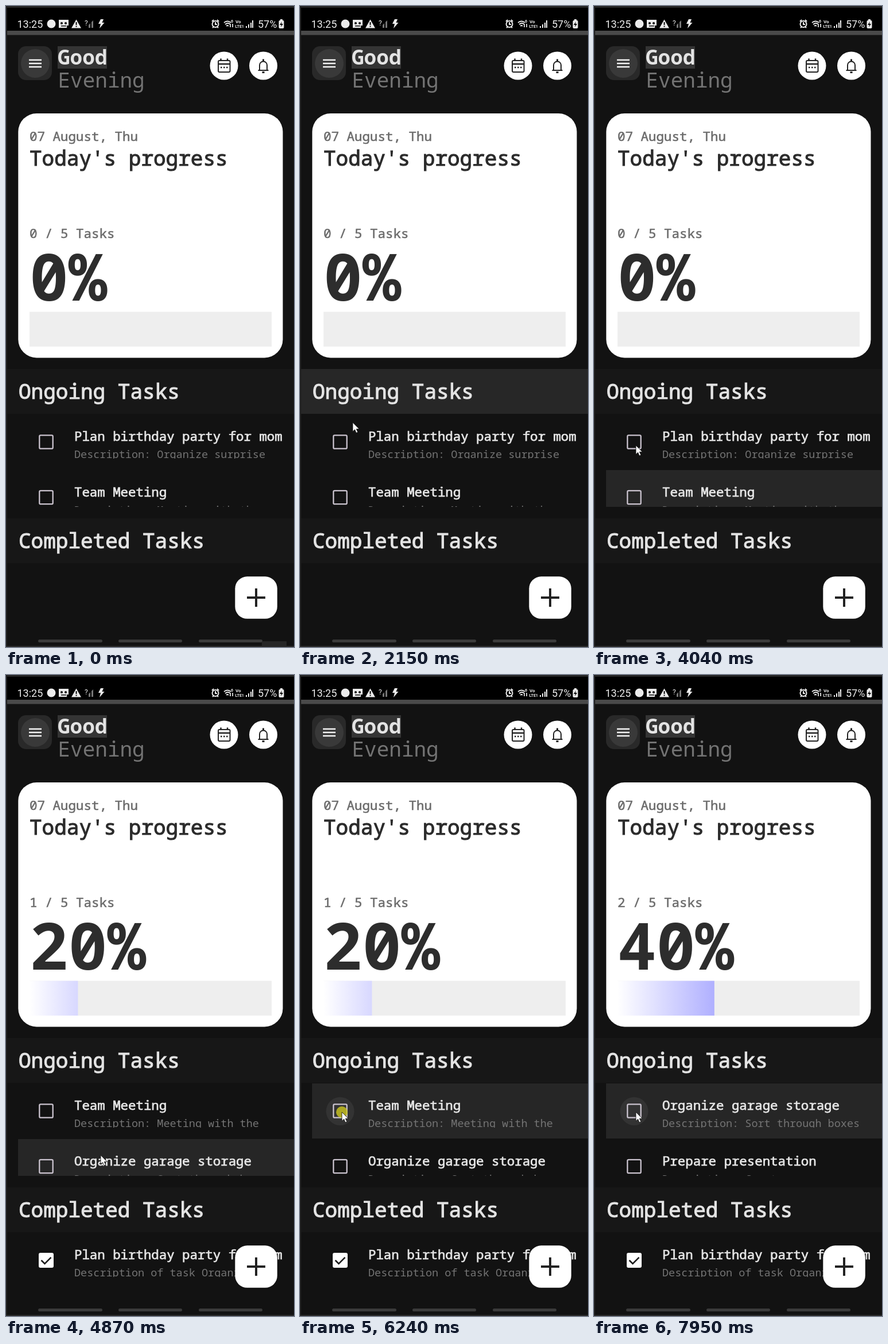
Animation, 502 px wide and 1116 px high, one loop 7.99 s. Source, as an HTML page:

```html
<!DOCTYPE html>
<html lang="en">
<head>
<meta charset="utf-8">
<title>Task list</title>
<style>
  html, body { margin: 0; width: 100%; height: 100%; overflow: hidden; background: #121212; }
  svg { display: block; width: 502px; height: 1116px; }
  text { font-family: "Noto Sans Mono", "DejaVu Sans Mono", monospace; white-space: pre; }
  .ui { font-family: Roboto, "Open Sans", sans-serif; }
  /* a thin outline gives the medium weight */
  .head { font-size: 36px; fill: #e4e4e4; stroke: #e4e4e4; stroke-width: 1.1; }
  .dark { fill: #2b2b2b; stroke: #2b2b2b; }
  .title { font-size: 22.4px; fill: #e6e6e6; stroke: #e6e6e6; stroke-width: .75; }
  .desc { font-size: 18.5px; fill: #747474; }
  .meta { font-size: 22.5px; fill: #6c6c6c; stroke: #6c6c6c; stroke-width: .6; }
  .line { fill: none; stroke: #222; stroke-width: 2; }
  .box { fill: none; stroke: #cbc4cf; stroke-width: 2.3; }
</style>
</head>
<body>
<svg viewBox="0 0 502 1116" xmlns="http://www.w3.org/2000/svg">
  <defs>
    <linearGradient id="fade" gradientUnits="userSpaceOnUse" x1="41" x2="463">
      <stop stop-color="#fff"/><stop offset="1" stop-color="#3939ff"/>
    </linearGradient>
    <clipPath id="clip1"><rect x="21" y="711" width="481" height="77"/></clipPath>
    <clipPath id="clip2"><rect x="21" y="808" width="481" height="64"/></clipPath>
    <clipPath id="clip3"><rect x="21" y="970" width="481" height="78"/></clipPath>
  </defs>

  <rect width="502" height="1116" fill="#121212"/>
  <rect width="502" height="3" fill="#262626"/>
  <rect y="3" width="502" height="40" fill="#000"/>
  <rect y="43" width="502" height="7.5" fill="#4a4a4a"/>

  <!-- status bar -->
  <g fill="#ececec">
    <text class="ui" x="19.5" y="37.5" font-size="18">13:25</text>
    <circle cx="79" cy="31" r="7.5"/>
    <path d="M92 24h17v10h-3v4h-14z"/>
    <path d="M122.5 23.5L131 38.5H114z"/>
    <path d="M165 23h5l-2.5 6h4l-8.5 10 2-8h-4z"/>
    <path d="M152 25v13h-3v-10zM147 30v8h-3v-5z" fill="#777"/>
    <text class="ui" x="137" y="34" font-size="12">?</text>
    <text class="ui" x="439" y="37.5" font-size="18">57%</text>
    <rect x="475.5" y="25" width="9" height="14" rx="2"/><rect x="478" y="23" width="4" height="3"/>
    <path d="M418 38v-3h2v3zm4 0v-6h2v6zm4 0v-9h2v9z"/><path d="M429 38V25h2v13z"/>
    <text class="ui" x="400" y="30" font-size="8" font-weight="700">Vo</text>
    <text class="ui" x="399.5" y="38" font-size="7" font-weight="700">LTE1</text>
    <text class="ui" x="392" y="29" font-size="7" font-weight="700">6</text>
  </g>
  <g fill="none" stroke="#ececec" stroke-width="2">
    <circle cx="365" cy="31.5" r="5.5"/><path d="M365 28v4h3M359 27l3-3M371 27l-3-3M360 38l2-2M370 38l-2-2"/>
    <path d="M380 29q6-5 12 0M382 32q5-4 9 0M384 35q2-2 4 0M391 37v-6M395 31v6" stroke-width="1.7"/>
  </g>
  <g fill="#000">
    <circle cx="97" cy="30" r="2"/><circle cx="104" cy="30" r="2"/><rect x="96" y="34" width="9" height="1.5"/>
    <rect x="121.6" y="28" width="1.9" height="5"/><rect x="121.6" y="34.5" width="1.9" height="2"/>
    <path d="M481 27l-4 6h3l-1 4 4-6h-3z"/>
  </g>

  <!-- app header -->
  <rect x="21" y="70" width="59" height="59" rx="14" fill="#292929"/>
  <circle cx="51" cy="100" r="25" fill="#393939"/>
  <path d="M40 94h22M40 100h22M40 106h22" stroke="#f4f4f4" stroke-width="2.3"/>
  <rect x="90" y="70" width="86" height="39" fill="#343434"/>
  <text class="head" x="90" y="102" style="font-weight:700;stroke:none">Good</text>
  <text class="head" x="90.5" y="142" style="fill:#737373;stroke:none">Evening</text>
  <circle cx="380" cy="104" r="24.5" fill="#fff"/>
  <circle cx="448.5" cy="104" r="24.5" fill="#fff"/>
  <g class="line">
    <rect x="370" y="95" width="20.5" height="20" rx="2"/>
    <path d="M370 101h20.5M374.5 91.5v4M386 91.5v4" stroke-width="2.5"/>
    <path d="M374 107h2.5m2.5 0h2.5m2.5 0h2.5" stroke-width="2.5"/>
    <path d="M439.5 112h18M442 112v-9a6.5 6.5 0 0 1 13 0v9"/>
    <path d="M448.5 92.5v4M446.5 115.5h4" stroke-width="3"/>
  </g>

  <!-- progress card -->
  <rect x="21.3" y="187" width="461.2" height="425.4" rx="32" fill="#fff"/>
  <text class="meta" x="41" y="234.5">07 August, Thu</text>
  <text class="head dark" x="41" y="278">Today's progress</text>
  <text class="meta" x="41" y="404" id="count"></text>
  <text x="41" y="513" font-size="113" font-weight="700" fill="#2d2d2d" id="percent"></text>
  <rect x="41" y="532.5" width="422" height="60.5" fill="#eee"/>
  <rect x="41" y="532.5" height="60.5" fill="url(#fade)" id="bar"/>

  <!-- sections -->
  <rect y="632" width="502" height="78" fill="#171717" id="band"/>
  <text class="head" x="22" y="684">Ongoing Tasks</text>
  <rect x="21" y="711" width="481" height="96" fill="#262626" id="hover1"/>
  <rect x="21" y="808" width="481" height="64" fill="#262626" id="hover2"/>
  <circle cx="70" cy="759.5" r="24.5" fill="#333" id="halo"/>
  <g clip-path="url(#clip1)">
    <text class="title" x="119" y="757" id="title1"></text>
    <text class="desc" x="119" y="787" id="desc1"></text>
    <rect class="box" x="58.3" y="747.3" width="23.4" height="23.4" rx="2"/>
  </g>
  <g clip-path="url(#clip2)">
    <text class="title" x="119" y="854" id="title2"></text>
    <text class="desc" x="119" y="884" id="desc2"></text>
    <rect class="box" x="58.3" y="843.8" width="23.4" height="23.4" rx="2"/>
  </g>
  <rect y="892" width="502" height="78" fill="#171717"/>
  <text class="head" x="22" y="944">Completed Tasks</text>
  <g clip-path="url(#clip3)" id="done">
    <text class="title" x="119" y="1017">Plan birthday party for mom</text>
    <text class="desc" x="119" y="1047">Description of task Organize</text>
    <rect x="57" y="1006" width="26" height="26" rx="3" fill="#fff"/>
    <path d="M61.5 1019l6 6 11-11" fill="none" stroke="#1c1c1c" stroke-width="2.5"/>
  </g>
  <rect x="399.3" y="993.3" width="73.5" height="73.5" rx="21" fill="#fff"/>
  <path d="M420 1030h32M436 1014v32" stroke="#222" stroke-width="4"/>

  <!-- window edges -->
  <rect width="2" height="1116" fill="#1e1e1e"/>
  <rect y="1114" width="502" height="2" fill="#282828"/>
  <path d="M58.5 1105.5h107M198.5 1105.5h106M338.5 1105.5h106" stroke="#3b3b3b" stroke-width="5" stroke-linecap="round"/>
  <rect x="446" y="1106" width="43" height="10" fill="#262626" id="corner"/>

  <circle cx="73" cy="761" r="10" fill="#c9c321" opacity=".82" id="press"/>
  <path d="M0 0V15.5L3.6 12.2 6 18 8.8 16.8 6.3 11.3H11.2Z" fill="#fff" stroke="#111" stroke-width=".8" id="cursor"/>
</svg>
<script>
const LOOP = 7990;
const $ = id => document.getElementById(id);
const start = performance.now();

const tasks = [
  ['Plan birthday party for mom', 'Organize surprise'],
  ['Team Meeting', 'Meeting with the'],
  ['Organize garage storage', 'Sort through boxes'],
  ['Prepare presentation', 'Create'],
];

// time, x, y of the pointer tip
const path = [
  [1120, 467, 622], [1300, 410, 545], [1500, 335, 444], [1680, 300, 397], [1800, 245, 480],
  [1910, 206, 590], [2030, 140, 670], [2150, 92, 725], [2330, 86, 760], [2540, 130, 820],
  [2740, 178, 851], [2830, 180, 866], [3000, 183, 852], [3110, 214, 792], [3320, 277, 758],
  [3560, 190, 748], [3770, 106, 746], [3900, 68, 748], [4040, 73, 765], [4380, 73, 765],
  [4620, 115, 800], [4870, 165, 836], [5010, 168, 852], [5200, 140, 872], [5360, 95, 835],
  [5510, 74, 786], [5740, 73, 762], [5840, 73, 761], [LOOP, 73, 761],
];

const clamp = v => Math.min(1, Math.max(0, v));
const show = (id, on) => $(id).setAttribute('visibility', on ? 'visible' : 'hidden');
const put = (id, text) => { if ($(id).textContent !== text) $(id).textContent = text; };
const within = (t, from, to) => t >= from && t < to;

function pointer(t) {
  const i = Math.max(1, path.findIndex(p => p[0] > t));
  const [t0, x0, y0] = path[i - 1], [t1, x1, y1] = path[i];
  const k = clamp((t - t0) / (t1 - t0));
  return [x0 + (x1 - x0) * k, y0 + (y1 - y0) * k];
}

function draw(t) {
  const done = (t >= 4300) + (t >= 6350);
  put('count', `${done} / 5 Tasks`);
  put('percent', `${done * 20}%`);
  [1, 2].forEach(row => {
    const [title, desc] = tasks[done + row - 1];
    put('title' + row, title);
    put('desc' + row, 'Description: ' + desc);
  });
  const fill = clamp((t - 4300) / 500) + clamp((t - 6350) / 500);
  $('bar').setAttribute('width', 84.4 * fill);

  $('band').setAttribute('fill', within(t, 2030, 2320) ? '#272727' : '#171717');
  show('corner', t < 30);
  show('hover1', within(t, 2320, 2560) || t >= 5620);
  show('hover2', within(t, 2560, 5620));
  show('halo', within(t, 4180, 4500) || t >= 5660);
  show('press', within(t, 4180, 4300) || within(t, 6240, 6350));
  show('done', done > 0);
  show('cursor', t >= 1120);
  $('cursor').setAttribute('transform', `translate(${pointer(t)})`);
}

function tick() {
  draw((performance.now() - start) % LOOP);
  requestAnimationFrame(tick);
}
tick();
</script>
</body>
</html>
```
